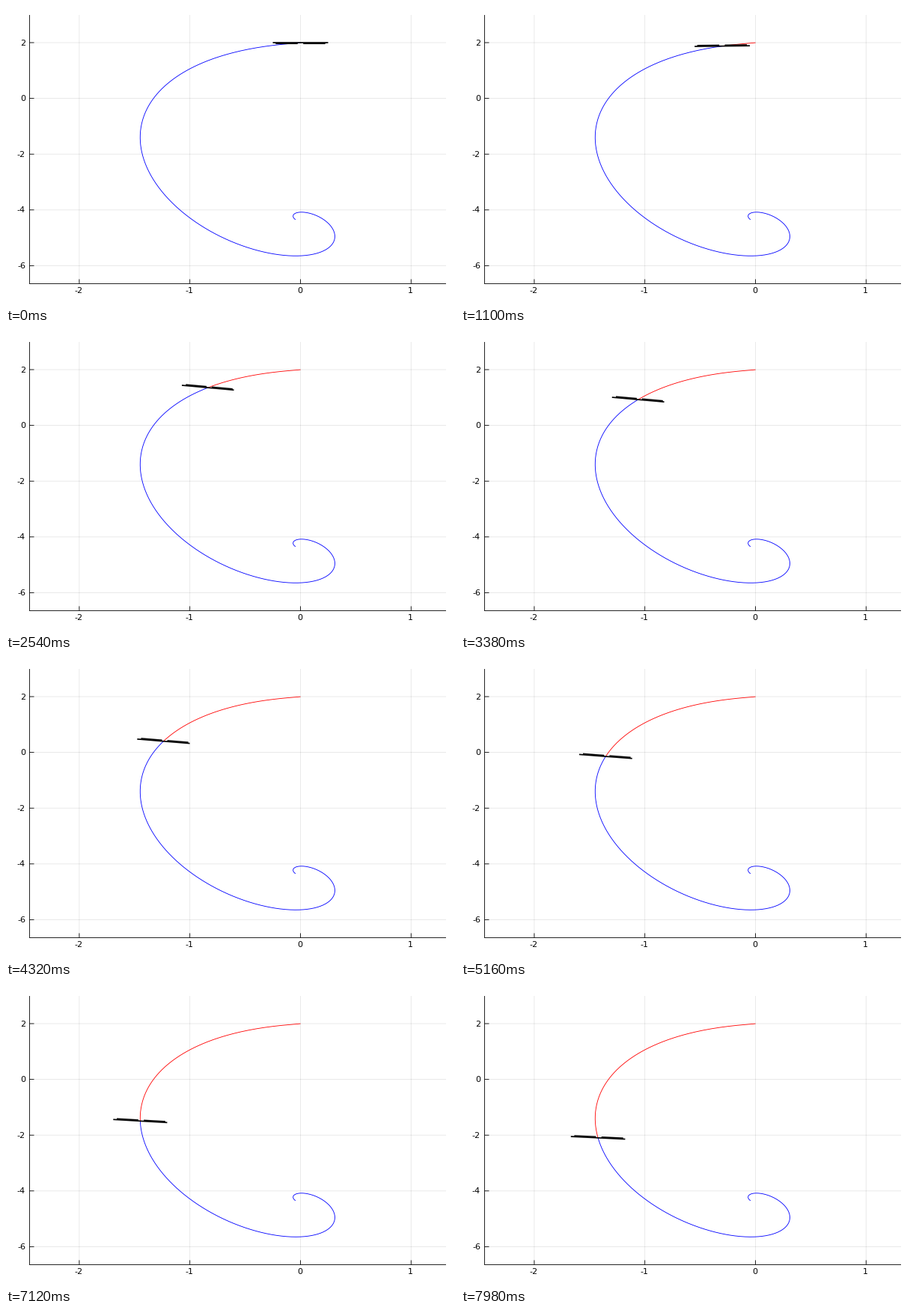
Write a matplotlib script that moves like this. It is 600x400 px and loops after 8000 ms.

```python
import numpy as np
import matplotlib.pyplot as plt
from matplotlib.animation import FuncAnimation

W, H, DPI = 600, 400, 100
PX = 72 / DPI                      # one pixel in points
SX, SY = 147.8, 37.3               # pixels per data unit
OX, OY = 393.5, 123.6              # pixel position of the data origin
LEFT, RIGHT, TOP, BOTTOM = 31.5, 588, 12, 371.5
THIN = 0.85                        # line width of axes and path, in pixels
STEPS = 1050                       # length of the whole flight
TICKS = 400                        # 20 ms each

# Closed-loop response of the drone: both axes are damped oscillators.
OMEGA = 0.007945                   # radians per step
KX, KY = 0.49, 0.5043              # decay per radian
SWING = 412                        # sideways push, in pixels
LAG = 8.7                          # steps lost while the drone flips over
FLIP = 6.2                         # time constant of the flip, in steps
START_Y, GOAL_Y = 49, 285.75

step = np.arange(STEPS)
phase = OMEGA * step
late = OMEGA * (step - LAG * np.tanh(step / LAG))

path_x = OX - SWING * np.exp(-KX * late) * np.sin(late)
path_y = GOAL_Y - (GOAL_Y - START_Y) * np.exp(-KY * phase) * (
    np.cos(phase) + KY * np.sin(phase))

# The drone leans with its sideways acceleration and starts upside down.
lean = 0.353 * np.exp(-KX * late) * (
    (KX ** 2 - 1) * np.sin(late) - 2 * KX * np.cos(late))
flip = (np.pi - lean[0]) * (1 + step / FLIP) * np.exp(-step / FLIP)
tilt = lean + flip

fig = plt.figure(figsize=(W / DPI, H / DPI), dpi=DPI, facecolor="white")
ax = fig.add_axes([0, 0, 1, 1])
ax.set_xlim(0, W)
ax.set_ylim(H, 0)
ax.axis("off")


def line(xs=(), ys=(), color="black", width=THIN, alpha=1):
    return ax.plot(xs, ys, color=color, lw=width * PX, alpha=alpha,
                   solid_capstyle="butt", snap=False)[0]


def label(x, y, value, ha):
    ax.text(x, y, str(value), ha=ha, va="center_baseline",
            family="DejaVu Sans", fontsize=8)


for value in range(-2, 2):
    x = OX + SX * value
    line([x, x], [TOP, BOTTOM], alpha=0.1)
    line([x, x], [BOTTOM, BOTTOM - 6])
    label(x - 0.5, 380.2, value, "center")
for value in range(-6, 3, 2):
    y = OY - SY * value
    line([LEFT, RIGHT], [y, y], alpha=0.1)
    line([LEFT, LEFT + 6], [y, y])
    label(26, y - 0.4, value, "right")
line([LEFT, LEFT], [TOP, BOTTOM + 0.5])
line([LEFT, RIGHT], [BOTTOM, BOTTOM])

ahead = line(color="blue")
flown = line(color="red")

# Drone parts in data units: (from, to, height above the body)
PARTS = [(-0.25, 0.25, 0), (-0.225, -0.025, 0.035), (0.025, 0.225, 0.035)]
drone = [line(width=w) for w in (1.7, 1.5, 1.5)]


def step_at(tick):
    """Three steps per seven ticks, held for 1, 5 and 1 ticks."""
    cycle, r = divmod(tick, 7)
    return 3 * cycle + (r > 0) + (r == 6)


def update(tick):
    n = step_at(tick)
    flown.set_data(path_x[:n + 1], path_y[:n + 1])
    ahead.set_data(path_x[n:], path_y[n:])
    c, s = np.cos(tilt[n]), np.sin(tilt[n])
    for part, (a, b, up) in zip(drone, PARTS):
        along = np.array([a, b])
        part.set_data(path_x[n] + SX * (along * c - up * s),
                      path_y[n] - SY * (along * s + up * c))
    return [ahead, flown, *drone]


anim = FuncAnimation(fig, update, frames=TICKS, interval=20,
                     repeat=True, repeat_delay=0, blit=False)
plt.show()
```
